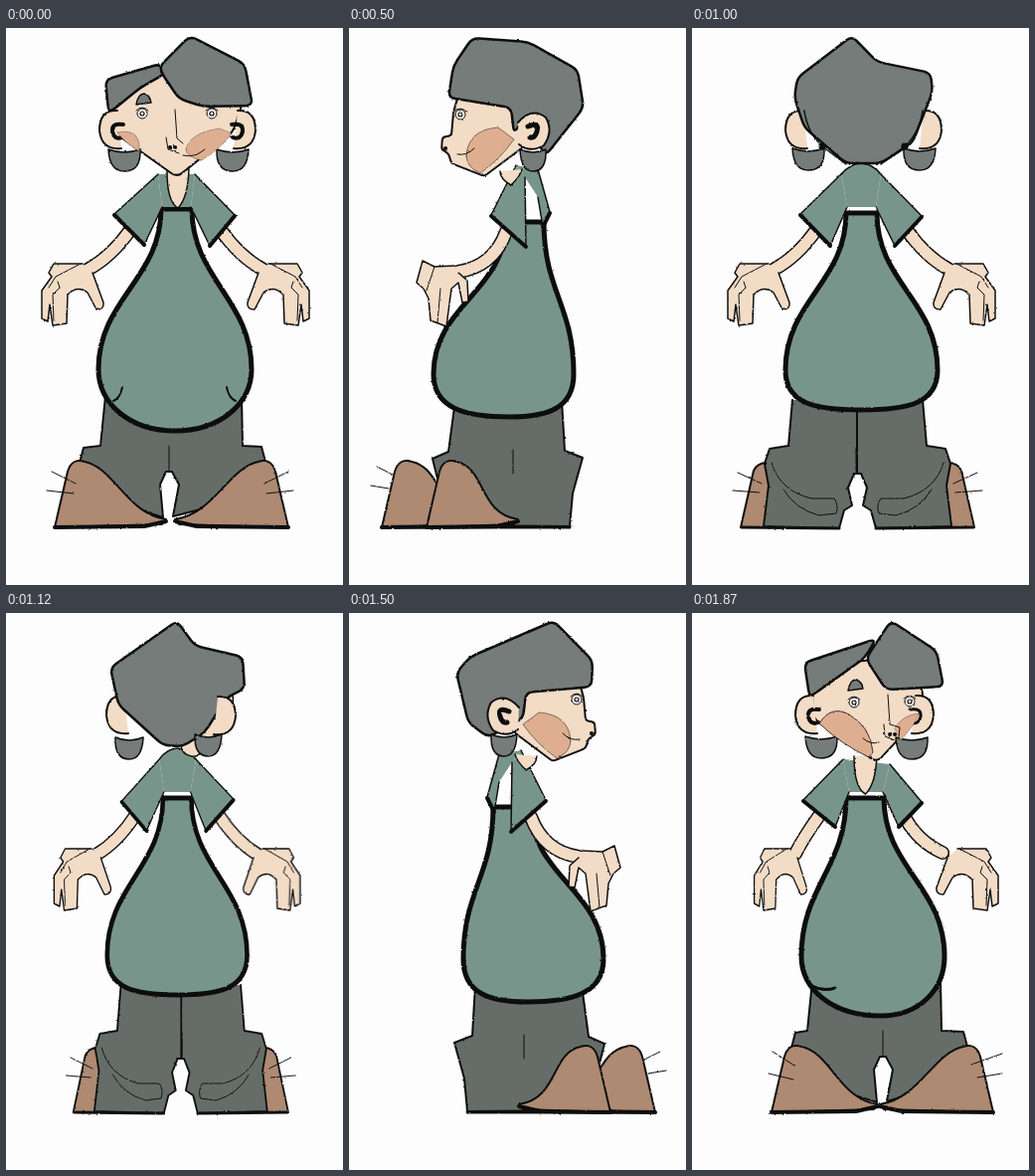
An HTML page for the animation above (2 s loop, 339 by 560 pixels).

```html
<!DOCTYPE html>
<html lang="en">
<head>
<meta charset="utf-8">
<title>Character turnaround</title>
<style>
html, body { margin: 0; width: 100%; height: 100%; overflow: hidden; background: #fdfdfd; }
svg { display: block; width: 339px; height: 560px; }
path { stroke: #111; stroke-linecap: round; stroke-linejoin: round; }
.view { visibility: hidden; animation: short 2s step-end infinite; }
.view.odd { animation-name: long; }
@keyframes short { 0% { visibility: visible; } 6%, 100% { visibility: hidden; } }
@keyframes long { 0% { visibility: visible; } 6.5%, 100% { visibility: hidden; } }
</style>
</head>
<body>
<svg viewBox="0 0 339 560">
  <filter id="ink" x="0" y="0" width="339" height="560" filterUnits="userSpaceOnUse">
    <feTurbulence type="fractalNoise" baseFrequency=".35" numOctaves="2" seed="4"/>
    <feDisplacementMap in="SourceGraphic" scale="2" xChannelSelector="R" yChannelSelector="G"/>
  </filter>
  <g id="stage" filter="url(#ink)"></g>
</svg>
<script>
const skin = '#f3dcc6', green = '#78958c', cloth = '#666d69', brown = '#ae8a72';
const grey = '#747b7a', blush = '#dfae90', white = '#fdfdfd', none = 'none';

// Drawing basics
const path = (fill, width, d) =>
  `<path fill="${fill}" ${width ? `stroke-width="${width}"` : 'style="stroke:none"'} d="${d}"/>`;
const line = (width, d) => path(none, width, d);
const place = (matrix, inner) => `<g transform="matrix(${matrix})">${inner}</g>`;
const flip = (axis, inner) => place(`-1 0 0 1 ${axis} 0`, inner);
const both = (axis, inner) => inner + flip(axis, inner);

// Closed polygon with rounded corners
function blob(fill, width, points, r = 7) {
  const n = points.split(' ').map(Number), count = n.length / 2;
  const at = i => [n[(i + count) % count * 2], n[(i + count) % count * 2 + 1]];
  const toward = (p, q) => {
    const k = Math.min(r / Math.hypot(q[0] - p[0], q[1] - p[1]), .45);
    return `${p[0] + (q[0] - p[0]) * k} ${p[1] + (q[1] - p[1]) * k}`;
  };
  let d = '';
  for (let i = 0; i < count; i++) {
    const p = at(i);
    d += `${i ? 'L' : 'M'}${toward(p, at(i - 1))}Q${p} ${toward(p, at(i + 1))}`;
  }
  return path(fill, width, d + 'Z');
}

// Clothes and limbs
function pear(a, b, top, l, r, y, low, mid) {
  const side = x => mid + (x - mid) * .6;
  return path(green, 5, `M${a} ${top}C${a} ${top + 70} ${l} ${y - 70} ${l} ${y}` +
    `C${l} ${y + 34} ${side(l)} ${low} ${mid} ${low}C${side(r)} ${low} ${r} ${y + 34} ${r} ${y}` +
    `C${r} ${y - 70} ${b} ${top + 70} ${b} ${top}Z`);
}
// A sleeve is shoulder, outer cuff, inner cuff, armpit
function sleeves(...pair) {
  const [[lx, ly, , , , , la, lb], [rx, ry, , , , , ra, rb]] = pair;
  return path(green, 0, `M${lx} ${ly}L${la} ${lb} ${ra} ${rb} ${rx} ${ry}Z`) +
    pair.map(([x, y, ox, oy, ix, iy, px, py]) =>
      path(green, 1.5, `M${x} ${y}L${ox} ${oy} ${ix} ${iy} ${px} ${py}`) +
      line(4, `M${ox} ${oy + 1}L${ix} ${iy}`)).reverse().join('');
}
const neck = (l, r, low) =>
  path(skin, 1.5, `M${l} 144Q${l} ${low - 6} ${(l + r) / 2} ${low}Q${r - 1} ${low - 10} ${r} 142`);
const arm = (x, y, ex, ey, hx, hy) => {
  const d = `M${x} ${y}Q${ex} ${ey} ${hx} ${hy}`;
  return line(14, d) + path(none, 11, d).replace('<path', `<path style="stroke:${skin}"`);
};
const pants = (l, r, cl, cr, c) => path(cloth, 2, `M${l} 370L${l - 5} 420 ${cl} 422 ${cl - 4} 437 ${c - 44} 480 ` +
  `${c - 6} 492 ${c - 9} 459 ${c - 3} 446H${c + 3}L${c + 10} 459 ${c + 4} 491 ${cr - 7} 470 ${cr + 4} 436 ${cr} 421 ${r + 1} 420 ${r} 370Z`) +
  line(1, `M${c} 420V446`);
function shoe(out, tip) {
  const d = Math.sign(tip - out), x = n => out + n * d;
  return path(brown, 2, `M${out} 502L${x(13)} 446Q${x(17)} 432 ${x(30)} 436C${x(60)} 442 ${tip - 40 * d} 488 ${tip} 494L${tip - 4 * d} 499Z`) +
    line(4, `M${out} 502L${tip - 22 * d} 501 ${tip} 496`);
}
const hand = () => path(skin, 1.5, 'M77 237L48 237 43 246 46 250 36 264 36 292 42 295 44 278 47 299 61 297 62 268Q72 258 82 266L91 283Q99 283 98 276L87 246') +
  line(1, 'M75 237L50 250 43 261 M52 255L54 261 47 268 48 294');
const looseHand = () => path(skin, 1.5, 'M106 239L86 240 74 234 68 256 75 262 80 272 82 294 98 300 103 262 110 256 114 276 120 275 119 254 110 246') +
  line(1, 'M89 296L92 262 M86 240L78 264');

// Bodies
function front() {
  return pants(100, 237, 78, 257, 164) + shoe(49, 161) + shoe(284, 170) +
    both(330, line(1, 'M46 446L70 458 M41 465L68 468')) +
    both(341, arm(125, 203, 106, 230, 82, 243) + hand()) +
    pear(156, 187, 182, 93, 247, 343, 405, 170) +
    both(339, line(2, 'M108 375Q115 372 117 361')) +
    sleeves([153, 147, 109, 187, 139, 218, 157, 180], [190, 147, 230, 188, 205, 219, 186, 180]) + neck(162, 184, 181);
}
function quarter() {
  return pants(121, 250, 104, 273, 192) + shoe(80, 187) + shoe(303, 189) +
    line(1, 'M81 441L103 455 M77 463L102 469 M281 454L312 443 M287 467L312 463') +
    arm(127, 205, 112, 226, 104, 242) + place('.85 0 0 1 32 0', hand()) +
    arm(215, 207, 228, 230, 252, 241) + flip(344, hand()) +
    pear(155, 193, 186, 110, 254, 345, 405, 190) + line(3, 'M121 375Q132 381 144 377') +
    sleeves([152, 147, 112, 188, 144, 215, 158, 180], [199, 152, 231, 190, 208, 215, 192, 180]) + neck(163, 186, 182);
}
function half() {
  return pants(95, 218, 70, 233, 149) + shoe(35, 155) + shoe(247, 160) +
    line(1, 'M24 443L42 451 M20 463L40 465 M228 464L240 452 M232 480L246 474') +
    arm(142, 207, 125, 232, 104, 243) + place('1.05 0 0 .85 5 33', hand()) +
    pear(155, 193, 183, 88, 226, 348, 402, 150) + line(1, 'M166 393Q178 386 190 367') +
    arm(222, 210, 231, 225, 231, 240) + place('-.87 0 0 1 296 0', hand()) +
    sleeves([160, 147, 123, 187, 149, 214, 157, 182], [191, 137, 238, 190, 216, 220, 192, 181]) + neck(162, 181, 179);
}
function most() {
  return pants(130, 238, 106, 254, 206) + path(cloth, 2, 'M104 433L118 463 122 501H150L160 430') +
    shoe(217, 132) + shoe(286, 210) + line(3, 'M122 501H285') +
    line(1, 'M181 461L207 444 M194 474L208 466 M273 451L292 441 M275 465L291 460') +
    arm(203, 205, 216, 232, 238, 241) + place('-.83 0 0 .85 328 36', looseHand()) +
    arm(144, 205, 133, 222, 133, 240) +
    pear(145, 193, 200, 124, 253, 345, 400, 208) + line(1, 'M157 367Q165 378 178 383') +
    place('.9 0 0 1 70 2', hand()) +
    sleeves([162, 138, 131, 186, 168, 217, 170, 178], [190, 150, 209, 187, 196, 203, 192, 180]) + neck(171, 188, 178);
}
function side() {
  return path(cloth, 2, 'M107 374L100 426 84 433 92 465 104 500 222 501 225 468 235 432 217 425 214 374Z') +
    shoe(33, 130) + shoe(78, 170) + line(3, 'M33 502H222') +
    line(1, 'M28 441L44 449 M22 460L40 463 M165 424V448') +
    pear(158, 196, 195, 85, 226, 348, 391, 162) + arm(158, 205, 145, 240, 110, 245) + looseHand() +
    sleeves([168, 138, 143, 188, 178, 220, 177, 150], [190, 142, 202, 185, 195, 200, 190, 170]) + neck(152, 174, 158);
}
function rear() {
  return path(brown, 2, 'M33 503L37 448Q42 434 58 439L72 445 85 503Z') +
    path(skin, 1.5, 'M65 502Q66 475 78 462L110 502Z') + path(brown, 1.5, 'M140 460L150 455 185 502H140Z') +
    arm(202, 200, 212, 222, 214, 242) +
    blob(skin, 1.5, '206 241 222 237 227 247 225 280 219 297 212 290 214 268 204 262', 2) +
    path(cloth, 2, 'M109 376L106 425 76 428 67 440Q72 470 90 490Q115 502 143 498L146 486 140 466Q142 450 152 444L158 452 146 465Q150 490 165 500L220 503 222 463 237 432 218 424 215 376Z') +
    path(white, 0, 'M142 452L152 445 152 452 145 460Z') +
    line(1, 'M74 448Q92 475 128 480L137 482 140 494 126 495 100 475 M158 455Q170 482 206 492H210V478L190 475') +
    line(3, 'M33 502H222') + line(1, 'M33 438L42 445 M26 456L37 461') +
    pear(160, 196, 190, 90, 230, 346, 384, 162) + arm(155, 205, 145, 238, 108, 246) + looseHand() +
    sleeves([172, 138, 137, 189, 174, 221, 173, 150], [190, 142, 208, 194, 195, 206, 189, 160]);
}
function back() {
  const leg = path(brown, 2, 'M49 502L62 445Q66 436 78 437L82 502Z') +
    path(cloth, 2, 'M101 374L97 420 78 423 73 438 77 460 72 501 148 503 153 485 161 480 157 462 163 448H167V374') +
    line(1, 'M80 437Q88 465 120 473L143 473Q148 480 145 488L128 490Q104 484 92 464 M46 447L70 458 M41 465L68 467') +
    line(3, 'M50 502L148 503');
  return both(333, leg) + line(1, 'M165 422V446') +
    both(341, arm(125, 203, 106, 230, 82, 243) + hand()) +
    pear(155, 186, 186, 94, 247, 344, 384, 170) +
    sleeves([150, 147, 109, 187, 139, 219, 156, 180], [190, 147, 231, 189, 204, 219, 185, 180]) +
    path(green, 1.5, 'M150 147Q160 136 170 136Q181 136 190 147');
}

// Head parts
const eye = (x, y) => path(white, 1, `M${x - 5} ${y}a5 5 0 1 0 10 0a5 5 0 1 0-10 0`) +
  path(white, 1.2, `M${x - 2} ${y}a2 2 0 1 0 4 0a2 2 0 1 0-4 0`) + line(1, `M${x - 6} ${y - 3}q6-6 12 0`);
const brow = (x, y) => path(grey, 1.5, `M${x - 7} ${y}q2-11 8-11q6 2 7 9z`);
const ear = (x, y, swirl = 4) => path(skin, 2, `M${x + 18} ${y - 20}q-18-1-18 20q2 20 22 18`) +
  (swirl && line(swirl, `M${x + 24} ${y - 6}q-12-2-11 7q2 9 10 6`));
const sideEar = (x, y) => path(skin, 2, `M${x - 15} ${y - 8}q14-16 28-5q8 14-2 28q-14 8-25-1`) +
  line(5, `M${x - 5} ${y - 4}q12-5 9 5q-2 7-7 6`);
const earring = (x, y, w = 32) =>
  path(grey, 1.5, `M${x} ${y}q${w / 2} 6 ${w} 0q1 22 ${-w / 2} 22q${1 - w / 2} 0 ${-w / 2}-22z`);
const nostrils = (x, y, gap = 5) => line(4, `M${x} ${y}h.1M${x + gap} ${y}h.1`);

// Each head is [below the hair, above the hair]
const heads = {
  front: [blob(skin, 2, '107 76 110 106 172 150 228 105 238 76 200 45 145 45'),
    both(345, ear(94, 103)) + both(347, earring(103, 122)) +
    path(blush, .3, 'M112 105Q136 100 134 124Q120 116 112 105Z') +
    path(blush, .3, 'M181 122Q185 105 215 101L227 106Q215 122 197 133Q181 130 181 122Z') +
    eye(137, 86) + eye(207, 86) + brow(138, 77) + nostrils(165, 120) +
    line(1, 'M170 82L172 111 178 116 M161 110L163 122 174 126 M178 128Q190 131 200 122')],
  quarter: [blob(skin, 2, '121 78 122 106 186 150 228 105 233 78 200 45 155 50'),
    ear(104, 103) + flip(243, ear(0, 103, 3)) + earring(114, 124) + earring(205, 125) +
    path(blush, .8, 'M128 111Q140 92 158 102Q180 115 182 140L178 145Q150 132 128 111Z') +
    path(blush, .3, 'M204 116Q212 102 228 101Q226 110 210 128Z') +
    eye(163, 90) + eye(219, 89) + brow(164, 78) + nostrils(199, 122) +
    line(1, 'M197 82L199 112 209 115 208 124 M193 112L194 124 204 128 M172 126Q180 133 188 130')],
  half: [blob(skin, 2, '116 75 124 88 126 112 117 111 114 122 121 125 122 133 130 134 155 149 198 118 208 80 150 60', 3),
    sideEar(222, 99) + earring(200, 123, 34) +
    path(blush, .3, 'M158 130Q160 102 190 100L208 98Q198 125 172 142Q160 140 158 130Z') +
    eye(119, 88) + eye(162, 88) + brow(121, 78) + nostrils(123, 121, 3) +
    line(1, 'M127 88L126 113 132 118 M149 128Q162 128 172 121')],
  most: [blob(skin, 2, '157 66 155 118 210 148 223 137 234 135 236 125 242 122 241 112 232 110 236 84 200 42', 3),
    flip(276, sideEar(138, 102)) + earring(128, 120, 24) +
    path(blush, .8, 'M158 102Q180 95 200 106Q214 120 210 146Q180 138 156 120Z') +
    eye(205, 86) + eye(231, 86) + brow(205, 77) + nostrils(227, 119) +
    line(1, 'M231 95L226 112 222 117 M186 118Q192 130 209 128')],
  side: [blob(skin, 2, '112 60 105 85 103 108 94 110 93 122 100 126 103 136 136 149 175 120 185 80', 3),
    sideEar(185, 103) + earring(172, 122, 26) +
    path(blush, .5, 'M118 128Q120 102 150 100L166 112Q152 132 132 146Q118 140 118 128Z') +
    eye(112, 87) + nostrils(97, 121, 0) + line(1, 'M109 127Q118 129 126 121')],
  past: [blob(skin, 2, '108 75 104 92 98 104 106 126 138 149 160 140 170 110 150 76', 4),
    sideEar(172, 102) + earring(160, 122, 24) +
    path(blush, .5, 'M106 100Q122 94 134 108Q140 122 138 144Q112 130 106 100Z')],
  rear: [earring(191, 124, 25) + blob(skin, 2, '113 74 138 74 175 120 154 148 125 125 107 86 113 85', 3),
    path(blush, .8, 'M111 92Q128 88 136 108Q138 125 137 134Q120 118 111 92Z') + sideEar(162, 103) + earring(153, 123, 20)],
  nearBack: [blob(skin, 1.5, '112 80 114 104 150 146 165 140 160 90') + flip(240, ear(0, 103, 0)) + earring(203, 125, 28),
    ear(110, 104, 0) + earring(124, 122, 27)],
  back: [both(345, ear(94, 103, 0)) + both(346, earring(101, 121)),
    both(345, line(1.5, 'M113 83Q116 105 131 119L155 137') + line(7, 'M131 119h.1'))]
};

// Views in turning order
let scene = '', index = 0;
function view(body, matrix, head, mirrored, ...hair) {
  const turn = part => mirrored ? flip(341, part) : part;
  const [under, over] = heads[head];
  const start = Math.floor(index * 12.5) * 10;
  scene += `<g class="view${index++ % 2 ? ' odd' : ''}" style="animation-delay:${start - 2000}ms">` +
    place(matrix, body()) + turn(under) + hair.map(points => blob(grey, 2.5, points)).join('') + turn(over) + '</g>';
}
const plain = '1 0 0 1 0 0', turned = '-1 0 0 1 341 0', turnedRear = '-1 0 0 1 330 0';

view(front, plain, 'front', 0, '103 83 100 52 155 36 160 46 135 60 107 83', '157 46 155 38 185 8 240 36 248 78 198 79 174 71');
view(quarter, turned, 'quarter', 1, '109 81 103 50 140 40 145 52 116 78', '141 54 138 40 172 8 234 36 239 82 215 84 162 77');
view(half, plain, 'half', 0, '128 43 108 50 105 58 115 78 128 62', '126 62 126 43 144 9 182 14 240 44 236 88 214 86 203 104 198 80 139 76');
view(most, turned, 'most', 1, '102 72 106 38 125 10 180 14 234 44 232 88 195 88 186 106 182 80 130 76');
view(side, plain, 'side', 0, '100 70 105 38 124 10 180 14 230 42 236 80 198 128 175 92 166 106 163 80');
view(rear, plain, 'past', 0, '101 74 105 40 122 8 150 11 186 27 222 36 238 66 230 98 198 130 180 128 156 103 148 78');
view(rear, plain, 'rear', 0, '101 73 104 42 122 9 146 12 186 29 213 29 240 66 230 100 212 119 181 133 170 115 147 104 137 98 136 77');
view(back, '.92 0 0 1 8 0', 'nearBack', 0, '103 75 106 48 156 8 186 32 225 32 241 62 230 95 205 122 180 135 160 133 118 95');
view(back, plain, 'back', 0, '103 70 106 50 161 8 186 34 240 45 242 64 222 115 190 136 155 136 113 100');
view(back, '-.92 0 0 1 329 0', 'nearBack', 1, '172 8 190 33 238 44 240 76 222 85 200 120 178 134 158 133 113 92 105 55');
view(rear, turnedRear, 'rear', 1, '180 9 198 33 226 30 236 44 235 67 206 69 205 102 194 100 172 122 160 135 118 100 110 60 136 30');
view(rear, turnedRear, 'past', 1, '186 10 204 30 232 34 241 72 194 76 190 102 156 124 140 126 108 80 120 42');
view(side, turned, 'side', 1, '120 110 108 60 122 44 206 8 245 48 244 74 178 80 175 106 140 125');
view(most, plain, 'most', 0, '121 84 114 47 200 18 194 41 158 68 155 105 146 90', '194 40 208 8 254 54 251 75 224 77');
view(half, turned, 'half', 1, '118 90 112 46 196 22 160 60 143 102 137 90', '183 44 204 10 249 42 250 76 200 70');
view(quarter, plain, 'quarter', 0, '118 83 113 50 185 26 174 45 122 82', '175 46 200 8 246 38 253 74 195 77');

document.getElementById('stage').innerHTML = scene;
</script>
</body>
</html>
```
